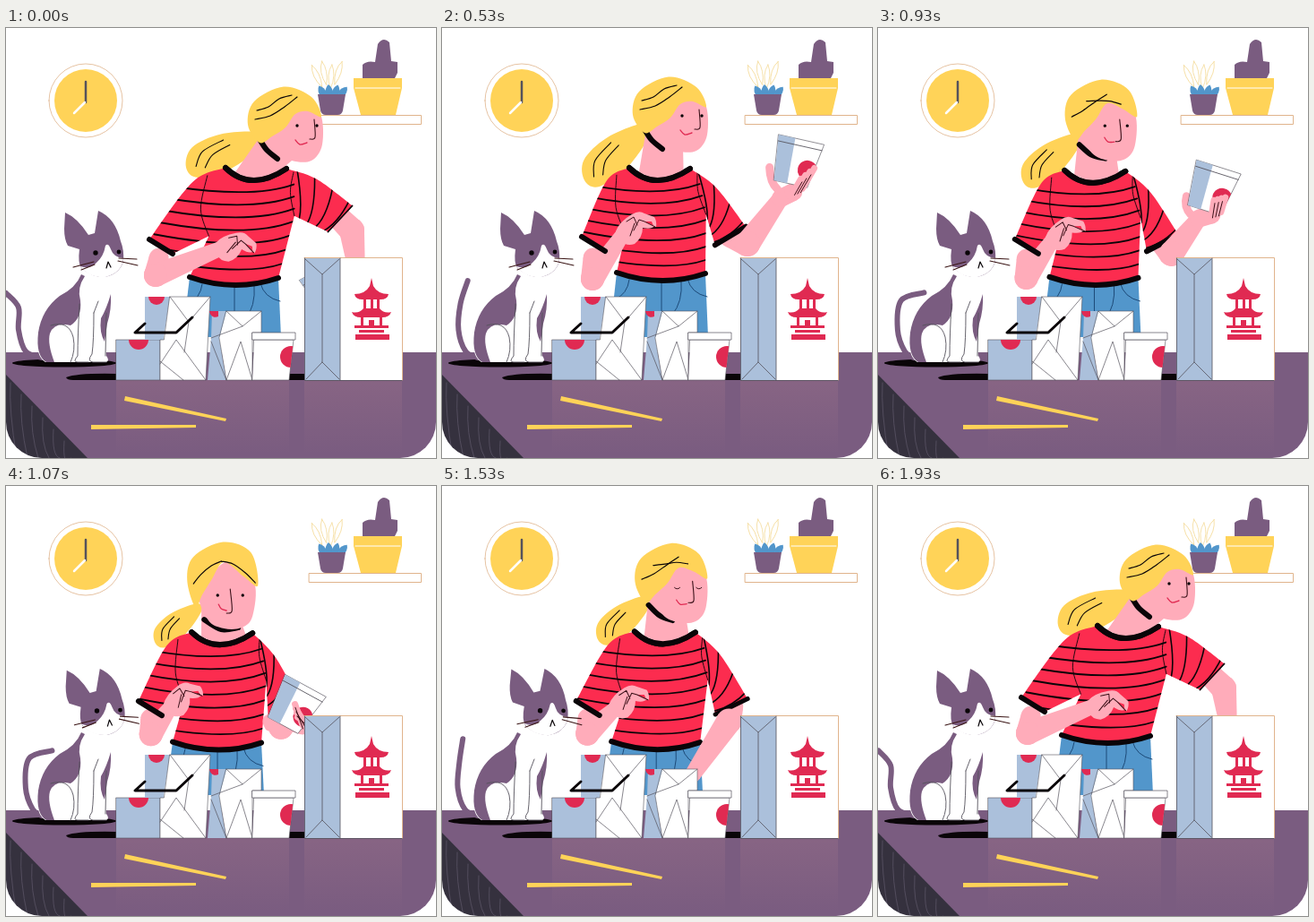
These frames come from a looping animation (480 px wide and 480 px high, 1990 ms). An HTML page with a canvas:

```html
<!DOCTYPE html>
<html lang="en">
<head>
<meta charset="utf-8">
<title>Packing takeaway</title>
<style>
html, body { margin: 0; width: 100%; height: 100%; overflow: hidden; background: #fff; }
canvas { display: block; width: 480px; height: 480px; border-radius: 0 0 40px 40px; }
</style>
</head>
<body>
<canvas id="stage" width="480" height="480"></canvas>
<script>
const ctx = document.getElementById('stage').getContext('2d');
const RED = '#fc2c4f', LABEL = '#e02a52', SKIN = '#ffacba', YELLOW = '#ffd358', PURPLE = '#7a5c80',
      JEANS = '#5296cb', BLUE = '#abc0db', WHITE = '#fff', INK = '#0a0508', FOLD = '#55525c',
      EDGE = '#e0b48c', CREASE = '#3a1018';
const LOOP = 1990, STEP = 200 / 3, FRAMES = 30;

// Geometry
const mix = (a, b, u) => a + (b - a) * u;
const mixPt = (a, b, u) => a.map((v, k) => mix(v, b[k], u));
const add = (p, x, y) => [p[0] + x, p[1] + y];
const pairs = list => list.flatMap((v, k) => k % 2 ? [] : [[v, list[k + 1]]]);

// Smooth path through all points.
function curve(pts, closed, start = 'M') {
  const n = pts.length;
  const at = k => closed ? pts[(k + n) % n] : pts[Math.max(0, Math.min(n - 1, k))];
  let d = start + pts[0];
  for (let k = 0; k < (closed ? n : n - 1); k++) {
    const [a, b, c, e] = [at(k - 1), at(k), at(k + 1), at(k + 2)];
    d += `C${add(b, (c[0] - a[0]) / 6, (c[1] - a[1]) / 6)} ${add(c, (b[0] - e[0]) / 6, (b[1] - e[1]) / 6)} ${c}`;
  }
  return closed ? d + 'Z' : d;
}
// Single bow from a to b passing through m.
const bow = (a, m, b, start = 'M') => `${start}${a}Q${[0, 1].map(k => 2 * m[k] - (a[k] + b[k]) / 2)} ${b}`;
const oval = (x, y, rx, ry = rx) => `M${x - rx},${y}a${rx},${ry} 0 1 0 ${2 * rx},0a${rx},${ry} 0 1 0 ${-2 * rx},0Z`;

function draw(d, fill, stroke, width = 1) {
  const p = new Path2D(d);
  if (fill) { ctx.fillStyle = fill; ctx.fill(p); }
  if (stroke) { ctx.strokeStyle = stroke; ctx.lineWidth = width; ctx.stroke(p); }
}
const line = (d, color = INK, width = 1) => draw(d, null, color, width);

function group(x, y, angle, paint) {
  ctx.save();
  ctx.translate(x, y);
  ctx.rotate(angle);
  paint();
  ctx.restore();
}
function clipped(d, paint) {
  ctx.save();
  ctx.clip(new Path2D(d));
  paint();
  ctx.restore();
}
function limb(a, b, ra, rb) {
  const t = Math.atan2(b[1] - a[1], b[0] - a[0]), s = Math.sin(t), c = Math.cos(t);
  const side = (p, r) => add(p, -s * r, c * r);
  draw(`M${side(a, ra)}L${side(b, rb)}L${side(b, -rb)}L${side(a, -ra)}Z`, SKIN);
  draw(oval(...a, ra), SKIN);
  draw(oval(...b, rb), SKIN);
}

// Three poses: reach into the bag, lift the cup, set it down.
const POSES = {
  head: [[311, 106], [254, 95], [242, 104]],
  ponyTip: [[204, 158], [163, 172], [170, 177]],
  neck: [[276, 170], [240, 170], [238, 178]],
  hip: [[255, 287], [245, 282], [235, 296]],
  leftCuff: [[173, 244], [169, 241], [160, 249]],
  leftElbow: [[167, 276], [168, 280], [161, 277]],
  leftWrist: [[240, 246], [202, 230], [182, 248]],
  leftTurn: [[.35], [0], [-.12]],
  rightCuff: [[373, 213], [322, 232], [310, 255]],
  rightElbow: [[386, 226], [341, 241], [303, 272]],
  cuffWidth: [[1.5], [6], [6]]
};
// The right hand takes the second half of the path later than the body.
const HAND = {
  wrist: [[392, 275], [378, 190], [250, 335]],
  cup: [[362, 290], [396, 148], [250, 340]],
  tilt: [[-.5], [.22], [.78]],
  grip: [[1.8], [0], [1.6]]
};

function ease(i, from, to) {
  const u = Math.max(0, Math.min(1, (i - from) / (to - from)));
  return u * u * (3 - 2 * u);
}

function poseAt(i) {
  const lift = ease(i, 0, 7.5), back = ease(i, 20.5, 29);
  const blend = (set, place) => Object.fromEntries(Object.entries(set).map(([name, [a, b, c]]) =>
    [name, mixPt(mixPt(mixPt(a, b, lift), c, place), a, back)]));
  const p = { ...blend(POSES, ease(i, 12, 17)), ...blend(HAND, ease(i, 12, 20)) };

  const swing = 72 * lift * (1 - lift);
  p.rightCuff[1] -= swing;
  p.rightElbow[1] -= swing;
  p.turn = Math.min(1, 1 - ease(i, 12, 16) + 3 * back);
  p.blink = Math.abs(i - 4) < 1.5 || Math.abs(i - 23) < 1.5;
  p.holding = i < 20;

  // Shirt corners follow from neck, hip and cuffs.
  const { neck, hip, leftCuff, rightCuff } = p;
  p.collar = [add(neck, -31, -14), neck, add(neck, 37, -13)];
  p.hem = [add(hip, -50, -9), hip, add(hip, 49, -8)];
  p.leftSleeve = [add(leftCuff, -13, -8), add(leftCuff, 13, 8)];
  const [cl, , cr] = p.collar;
  const dx = rightCuff[0] - cr[0], dy = rightCuff[1] - cr[1], r = 20 / Math.hypot(dx, dy);
  p.rightSleeve = [add(rightCuff, dy * r, -dx * r), add(rightCuff, -dy * r, dx * r)];
  p.shoulders = [add(mixPt(cl, p.leftSleeve[0], .35), -7, -12), add(mixPt(cr, p.rightSleeve[0], .4), 4, -5)];
  p.armpits = [add(mixPt(neck, hip, .55), -38, -2), add(mixPt(neck, hip, .34), 53, 0)];
  p.ponyRoot = add(p.head, mix(-28, -26, p.turn), mix(32, 17, p.turn));
  return p;
}

function wall() {
  draw(oval(89, 81, 41), WHITE, EDGE, .8);
  draw(oval(89, 81, 35), YELLOW);
  line('M89,60V83', FOLD, 2.5);
  line('M88,83L76,95', WHITE, 2.5);
  draw('M338.5,97.5H463.5V107.5H338.5Z', WHITE, EDGE);
  draw('M398,56V41Q403,36 412,38L415,18Q421,9 428,16L430,37L437,38V50L434,56Z', PURPLE);
  draw('M388,56H442V67L435,97H396L388,67Z', YELLOW);
  line('M390,67H440', WHITE);
  for (let k = 0; k < 4; k++)
    group(345 + k * 9, 50 - 4 * (k % 2), -.4 + k * .25, () => draw('M0,-9Q6,2 1,18Q-6,2 0,-9Z', WHITE, '#f5dc9c', .8));
  for (let k = 0; k < 4; k++)
    group(355 + k * 6, 75, -.5 + k * .4, () => draw('M-4,0Q-5,-8 0,-12Q5,-8 4,0Z', JEANS));
  draw('M348,74H379L376,92Q375,97 370,97H357Q352,97 351,92Z', PURPLE);
}

function table() {
  draw('M0,362H480V480H0Z', PURPLE);
  const glow = ctx.createLinearGradient(0, 393, 0, 476);
  glow.addColorStop(0, 'rgba(255,175,165,.1)');
  glow.addColorStop(1, 'rgba(255,175,165,0)');
  draw('M123,393H316V480H123ZM333,393H442V480H333Z', glow);
  draw('M0,387L91,480H0Z', '#35313e');
  for (let k = 0; k < 6; k++) {
    const x = 5 + k * 12, y = 396 + k * 13;
    line(`M${x},${y}Q${x - 2},${y + 30} ${x + 7},480`, '#5b5566', .8);
  }
  draw(oval(65, 374, 58, 4.5), INK);
  draw('M67,390Q80,385 124,386V393H75Q68,393 67,390ZM316,386H333V393H316Z', INK);
  draw('M133,411L246,436L245,439L132,416Z', YELLOW);
  draw('M95,443L212,443V446L95,448Z', YELLOW);
}

function boxes() {
  draw('M123,348H172V393H123Z', BLUE, FOLD, .6);
  draw('M137,348a11,11 0 0 0 22,0Z', LABEL);
  draw('M155,300H183L172,372V348H155Z', BLUE);
  draw('M159,300a9,9 0 0 0 18,0Z', LABEL);
  draw('M183,300H228L223,393H172V348H176Z', WHITE, FOLD, .6);
  line('M183,300L204,328L228,300M204,328L199,362M172,375L190,348L223,393M172,372L198,393', FOLD, .7);
  line('M155,330L144,340H190L208,323', INK, 3);
  draw('M230,316H246L238,346L246,393H225L229,346Z', BLUE);
  draw('M227,316a7,8 0 0 0 10,6V316Z', LABEL);
  draw('M246,316H285V340H275V393H246L238,346Z', WHITE, FOLD, .6);
  line('M246,316L264,333L285,316M229,346L264,333M246,393L262,350L275,393M229,350L246,393', FOLD, .7);
  const tub = 'M277,348H321L316,393H275Z';
  draw(tub, WHITE, FOLD, .6);
  clipped(tub, () => draw(oval(318, 367, 12), LABEL));
  draw('M275,340H323V348H275Z', WHITE, FOLD, .7);
}

function bag() {
  draw('M333,257H373V393H333Z', BLUE);
  draw('M373,257H442V393H373Z', WHITE);
  line('M333,256.5H442.5V393', EDGE);
  line('M333.5,257V393.5H442M373,257V393M334,258L353,275L372,258M353,275V373L335,392M353,373L372,392', FOLD, .8);
  // Pagoda
  draw('M408,279L410,288Q415,297 427,297Q426,303 418,303H398Q390,303 389,297Q401,297 406,288Z', LABEL);
  draw('M399,303H402V313H407V303H410V313H414V303H417V313Q422,319 430,317Q428,323 420,323H396Q388,323 386,317Q394,319 399,313Z', LABEL);
  draw('M396,323H399V332H405V326H411V332H417V323H420V332H427V335H389V332H396ZM394,337H422V340H394ZM390,342H428V348H390Z', LABEL);
}

function cat(i) {
  const w = -Math.cos(2 * Math.PI * i / FRAMES);
  line(curve([[40, 368], [26 + 4 * w, 361], [18 + 4 * w, 337], [20 + 6 * w, 308 - 4 * w], [26 + 26 * w, 282 + 14 * w * w]]), PURPLE, 6);
  draw('M86,268Q78,286 62,297Q40,314 36,340Q32,366 44,373H112Q116,371 112,366Q110,346 114,318Q120,296 112,270Z', WHITE);
  draw('M84,275Q78,290 60,299Q40,314 36,340Q33,366 45,373H54Q46,352 49,341Q54,328 72,332Q85,324 83,304Q79,290 88,277Z', PURPLE);
  draw('M117,297Q118,314 113,330L110,350Q104,340 106,324Q112,314 117,297Z', PURPLE);
  line('M50,332Q70,326 75,345Q78,360 72,373M82,308Q80,345 80,366Q74,373 80,373H92M98,318Q98,350 96,364Q90,372 97,373H112M112,318L111,366M103,305L98,318', FOLD, .9);
  const look = ease(i, 14, 22) - ease(i, 23, 29);
  group(105 + 9 * look, 265, .04 * look, () => {
    ctx.translate(-105, -265);
    draw('M66,206L65,224Q65,236 69,243L82,247Q80,262 84,268Q95,278 110,278Q127,275 131,260Q132,248 128,238Q122,212 103,204L99,229L92,231Q80,212 66,206Z', PURPLE);
    draw('M83,266Q93,270 101,262Q109,255 111,243Q114,239 117,247Q120,256 131,257Q130,273 111,278Q92,279 83,266Z', WHITE);
    draw(oval(100, 251, 2.7) + oval(126, 250, 2.4), INK);
    line('M112,268L114,261L117,267', INK, 1.2);
    line('M75,267L98,261M84,270L99,264M125,260L147,265M126,257L146,258', '#3a1515', 1.1);
  });
}

function ponytail({ ponyRoot: root, ponyTip: tip }) {
  const vx = tip[0] - root[0], vy = tip[1] - root[1];
  const at = (along, across) => add(root, vx * along - vy * across, vy * along + vx * across);
  draw(curve([at(0, .08), at(.45, .25), at(.85, .24), at(1.02, .04), at(.93, -.14), at(.5, -.2), at(0, -.08)], true), YELLOW);
  line(curve([at(.45, .17), at(.75, .14), at(.9, 0)]), INK, 1.1);
  line(curve([at(.4, .08), at(.65, .05), at(.8, -.06)]), INK, 1.1);
}

function shirt(p) {
  const { collar: [cl, cm, cr], hem: [hl, hm, hr], leftSleeve: [lo, li], rightSleeve: [ro, ri],
          shoulders: [ls, rs], armpits: [la, ra] } = p;
  draw(`M${hl}L${hr}L${hr[0] + 3},345L${hl[0] - 8},345Z`, JEANS);
  line(`M${add(hl, 14, 8)}q-2,16 -16,22M${hm}v60M${add(hr, -20, 6)}q4,16 22,20M${add(hm, 22, 0)}q2,24 -10,38`, '#1d4a78');

  const outline = curve([cl, ls, lo]) + `L${li}L${la}` + bow(hl, hm, hr, 'L') + `L${ra}L${ri}L${ro}`
    + curve([ro, rs, cr], false, 'L') + bow(cr, cm, cl, 'L') + 'Z';
  draw(outline, RED);
  clipped(outline, () => {
    for (let k = 1; k < 8; k++) {
      const u = k / 8, w = u / .45;
      const a = mixPt(add(ls, -14, -8), [lo[0] - 12, hl[1] - 8], u);
      const b = w < 1 ? mixPt(add(cr, 8, 4), ra, w) : mixPt(ra, hr, (u - .45) / .55);
      line(bow(a, add(mixPt(mixPt(a, b, .5), mixPt(cm, hm, u), .6), 0, 2), b), INK, 1.8);
    }
    for (let v = .15; v < 1; v += .25) {
      const a = mixPt(ra, ri, v), b = mixPt(cr, ro, v);
      line(bow(a, add(mixPt(a, b, .6), 3, 3), mixPt(a, b, 1.35)), INK, 1.6);
    }
    line(curve([la, mixPt(la, ls, .5), mixPt(ls, cl, .45)]), INK, .9);
    line(curve([ra, mixPt(ra, cr, .5), add(cr, 8, 4)]), INK, .9);
  });
  line(bow(hl, hm, hr), INK, 6);
  line(bow(cl, cm, cr), INK, 6);
  line(`M${ro}L${ri}`, INK, p.cuffWidth[0]);
}

function head({ head: [x, y], turn, blink, collar: [cl, cm, cr] }) {
  // Blends matching points of the front view and the side view.
  const view = (front, side) => pairs(mixPt(front, side, turn));
  const neck = [[x - 25, y + 12], [x + 15, y + 36], mixPt(cr, cm, .2), cm, mixPt(cl, cm, .35)];
  draw('M' + neck.join('L') + 'Z', SKIN);
  line(bow(cl, cm, cr), INK, 6);
  group(x, y, 0, () => {
    line(curve(view([-22, 46, -3, 57, 16, 55], [-28, 18, -20, 30, -8, 40])), INK, 6);
    draw(curve(view([10, -22, 34, 5, 32, 42, 20, 55, 0, 56, -18, 46, -27, 12],
                    [20, -24, 40, -10, 42, 24, 30, 42, 8, 42, -8, 32, -25, 10]), true), SKIN);
    const hairline = view([38, 8, 22, -2, 0, -18, -14, 2, -24, 18, -32, 32],
                          [41, -7, 26, -13, 12, -10, 1, 5, -14, 15, -28, 22]);
    draw(curve([...hairline, [-41, 2], [-34, -24], [-1, -40.5], [30, -29]], true), YELLOW);
    line(curve(view([-34, 6, -26, -4, -14, -14, -3, -19], [-33, -4, -16, -8, 0, -18, 14, -29])), INK, 1.2);
    line(curve(view([-3, -19, 10, -16, 24, -6, 35, 5], [-31, -14, -18, -18, -6, -27, 8, -31])), INK, 1.2);
    for (const [ex, ey] of view([-7, 19, 21, 19], [14, 3, 36, 3]))
      if (blink) line(bow([ex - 3, ey], [ex, ey + 1.5], [ex + 3, ey]), CREASE);
      else draw(oval(ex, ey, 1.7), INK);
    line(curve(view([7, 12, 9, 36, 3, 39], [33, -4, 34, 16, 28, 18])), CREASE, 1.1);
    line(curve(view([-6, 29, -3, 34, 3, 36], [12, 19, 17, 24, 25, 22])), LABEL, 1.3);
  });
}

function leftArm({ leftCuff, leftElbow, leftWrist, leftTurn, leftSleeve }) {
  limb(mixPt(leftCuff, leftElbow, .4), leftElbow, 11, 13);
  limb(leftElbow, leftWrist, 13, 8);
  group(...leftWrist, leftTurn[0], () => {
    draw('M-8,-3Q-4,-14 10,-22Q18,-27 24,-23L35,-19Q38,-14 37,-8Q34,-8 32,-14L24,-14L35,-9Q32,-5 22,-7Q22,4 13,11Q4,14 -2,8Z', SKIN);
    line('M4,-14L12,-19L16,-10M12,-4L18,-16L24,-14L36,-8M8,2L13,-12', CREASE);
  });
  line('M' + leftSleeve.join('L'), INK, 6);
}

function hand({ wrist, rightElbow, cup: [x, y], tilt: [angle], grip: [grip], holding }) {
  limb(rightElbow, wrist, 14, 9);
  if (!holding) return;
  const c = Math.cos(angle), s = Math.sin(angle);
  const hx = mix(4, 22, grip), hy = mix(35, 12, grip);
  limb(wrist, [x + hx * c - hy * s, y + hx * s + hy * c], 10, 10);
  group(x, y, angle, () => {
    line(`M-14,36Q-24,30 ${mix(-28, -14, grip)},${mix(14, 30, grip)}`, SKIN, 9);
    const shape = 'M-26,-24H26L18,27H-20Z';
    draw(shape, WHITE, FOLD, .6);
    draw('M-26,-24H-7L-5,27H-20Z', BLUE);
    clipped(shape, () => draw(oval(14, 8, 11), LABEL));
    line('M-25,-17H25', FOLD, .8);
    const finger = j => `M${hx + j * 3},${hy - j * 2}L${mix(9 + 4 * j, -3 + 3 * j, grip)},${mix(19 - 5 * j, -5 + 6 * j, grip)}`;
    for (let j = 0; j < 4; j++) line(finger(j), SKIN, 7);
    ctx.translate(2, 3);
    for (let j = 0; j < 3; j++) line(finger(j), CREASE, .9);
  });
}

function render(i) {
  const p = poseAt(i);
  ctx.clearRect(0, 0, 480, 480);
  ctx.lineCap = ctx.lineJoin = 'round';
  wall();
  table();
  ponytail(p);
  limb(p.rightCuff, p.rightElbow, 13, 14);
  shirt(p);
  head(p);
  hand(p);
  leftArm(p);
  boxes();
  bag();
  cat(i);
}

const begin = performance.now();
function tick() {
  const t = (performance.now() - begin) % LOOP;
  render(Math.min(FRAMES - 1, Math.floor((t + 3.4) / STEP)));
  requestAnimationFrame(tick);
}
tick();
</script>
</body>
</html>
```
